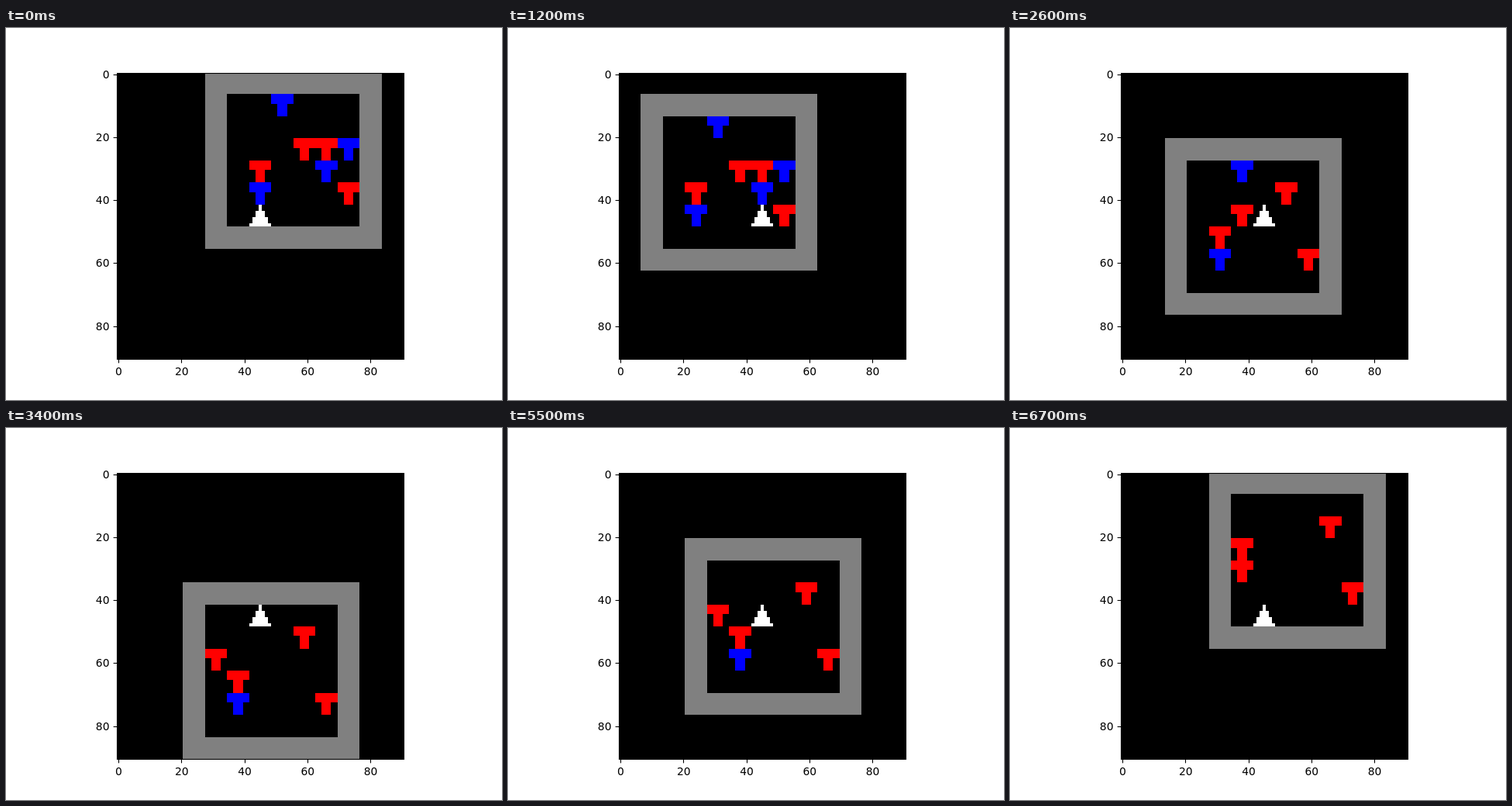
An HTML page with a canvas that plays this animation: 640 by 480 pixels, repeating every 6.8 s.

```html
<!DOCTYPE html>
<html lang="en">
<head>
<meta charset="utf-8">
<title>Grid world</title>
<style>
  html, body { margin: 0; width: 100%; height: 100%; overflow: hidden; background: #fff; }
  canvas { display: block; }
</style>
</head>
<body>
<canvas id="stage" width="640" height="480"></canvas>
<script>
const ctx = document.getElementById('stage').getContext('2d');
const STEP = 100, CELL = 7, UNITS = 91, ROOM = 6, CENTRE = 6;

// One move per step; a dot is a step without motion.
const MOVES = '...RRUR.LDR.U.ULRRU..DLUDULLL.URLRUDULL.......R...DD...RULDRDLDRLRDL';
const DIRS = { U: [0, -1], D: [0, 1], L: [-1, 0], R: [1, 0] };
const START = [1, 5];
const REDS = [[3, 2], [4, 2], [1, 3], [5, 4]];
const BLUES = [[2, 0], [5, 2], [4, 3], [1, 4]];

const inRoom = (x, y) => x >= 0 && y >= 0 && x < ROOM && y < ROOM;
const find = (list, x, y) => list.find(p => p[0] === x && p[1] === y);

// Reds are pushed, blues are collected.
function stateAt(step) {
  let [x, y] = START;
  const reds = REDS.map(p => [...p]);
  let blues = BLUES;
  for (const move of MOVES.slice(0, step + 1)) {
    if (move === '.') continue;
    const [dx, dy] = DIRS[move];
    const nx = x + dx, ny = y + dy;
    if (!inRoom(nx, ny)) continue;
    const red = find(reds, nx, ny);
    if (red) {
      const px = nx + dx, py = ny + dy;
      if (!inRoom(px, py) || find(reds, px, py) || find(blues, px, py)) continue;
      red[0] = px;
      red[1] = py;
    }
    x = nx;
    y = ny;
    blues = blues.filter(p => p[0] !== x || p[1] !== y);
  }
  return { x, y, reds, blues };
}

const px = u => Math.round(143 + 370 * u / UNITS);
const py = u => Math.round(57 + 370 * u / UNITS);

function block(x, y, w, h, color) {
  ctx.fillStyle = color;
  ctx.fillRect(px(x), py(y), px(x + w) - px(x), py(y + h) - py(y));
}

function tee(col, row, color) {
  const x = col * CELL, y = row * CELL;
  block(x, y, 7, 3, color);
  block(x + 2, y + 3, 3, 4, color);
}

function agent() {
  const o = CENTRE * CELL;
  for (let i = 0; i < CELL; i++) {
    const half = i >> 1;
    block(o + 3 - half, o + i, 2 * half + 1, 1, '#fff');
  }
}

function line(x1, y1, x2, y2) {
  ctx.beginPath();
  ctx.moveTo(x1, y1);
  ctx.lineTo(x2, y2);
  ctx.stroke();
}

function axes() {
  ctx.strokeStyle = ctx.fillStyle = '#000';
  ctx.lineWidth = 1.11;
  ctx.strokeRect(143.5, 58.5, 370, 369);
  ctx.font = '13.89px "DejaVu Sans", sans-serif';
  for (let v = 0; v <= 80; v += 20) {
    const offset = (v + 0.5) * 369.6 / UNITS;
    const x = Math.round(143.2 + offset) + 0.5;
    const y = Math.round(57.6 + offset) + 0.5;
    line(x, 427.5, x, 432.4);
    line(138.6, y, 143.5, y);
    ctx.textAlign = 'center';
    ctx.fillText(v, 143.2 + offset + 0.3, 448);
    ctx.textAlign = 'right';
    ctx.fillText(v, 133.5, Math.floor(y) + 5);
  }
}

function draw(step) {
  const { x, y, reds, blues } = stateAt(step);
  const left = CENTRE - x, top = CENTRE - y;

  ctx.fillStyle = '#fff';
  ctx.fillRect(0, 0, 640, 480);

  ctx.save();
  ctx.beginPath();
  ctx.rect(143, 58, 370, 369);
  ctx.clip();
  block(0, 0, UNITS, UNITS, '#000');
  block((left - 1) * CELL, (top - 1) * CELL, (ROOM + 2) * CELL, (ROOM + 2) * CELL, '#808080');
  block(left * CELL, top * CELL, ROOM * CELL, ROOM * CELL, '#000');
  for (const [c, r] of reds) tee(left + c, top + r, '#f00');
  for (const [c, r] of blues) tee(left + c, top + r, '#00f');
  agent();
  ctx.restore();

  axes();
}

const start = performance.now();
function tick(now) {
  const t = Math.max(0, now - start);
  draw(Math.floor(t / STEP) % MOVES.length);
  requestAnimationFrame(tick);
}
draw(0);
requestAnimationFrame(tick);
</script>
</body>
</html>
```
